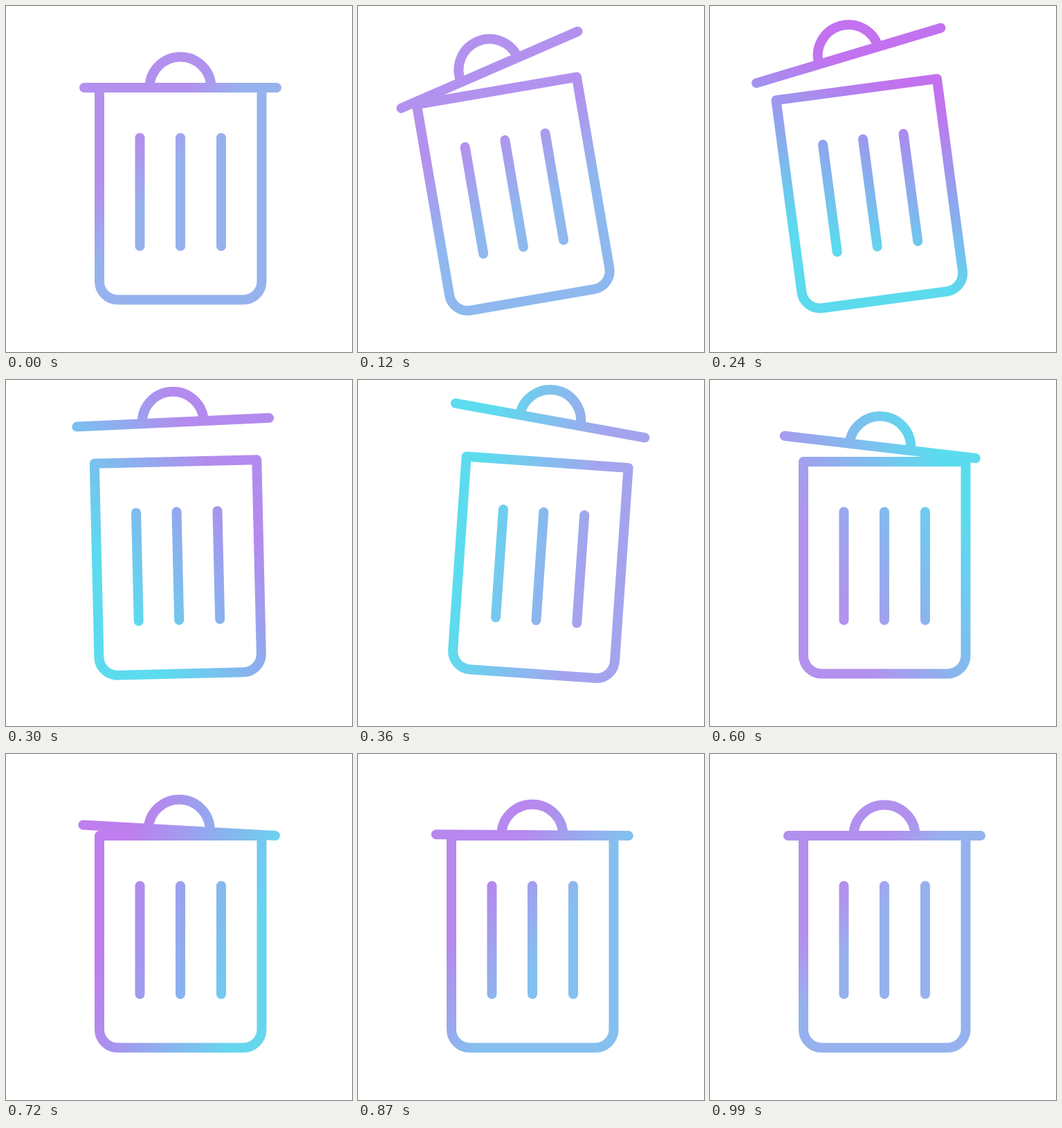
An HTML page that plays this animation: 500 by 500 pixels, repeating every 3020 ms.

```html
<!DOCTYPE html>
<html lang="en">
<head>
<meta charset="utf-8">
<title>Trash can</title>
<style>
  html, body { margin: 0; width: 100%; height: 100%; overflow: hidden; background: #fff; }
  svg { display: block; width: 100%; height: 100%; }
  #can { fill: none; stroke: #fff; stroke-width: 14; stroke-linecap: round; stroke-linejoin: round; }
</style>
</head>
<body>
<svg viewBox="0 0 500 500">
  <defs>
    <linearGradient id="paint" gradientUnits="userSpaceOnUse">
      <stop id="warm" offset="0"/>
      <stop id="cool" offset="1"/>
    </linearGradient>
    <mask id="shape" maskUnits="userSpaceOnUse" x="0" y="0" width="500" height="500">
      <g id="can">
        <path d="M135 118H369.5V398a26.5 26.5 0 0 1-26.5 26.5H161.5a26.5 26.5 0 0 1-26.5-26.5Z"/>
        <path d="M193.5 190.5V347M252 190.5V347M311 190.5V347"/>
        <path id="lid" d="M-139 0H139M-44.5 0a44.5 44.5 0 0 1 89 0"/>
      </g>
    </mask>
  </defs>
  <rect width="500" height="500" fill="url(#paint)" mask="url(#shape)"/>
</svg>
<script>
const LOOP = 3020, STEP = 30, END = 990;
const $ = id => document.getElementById(id);

// Monotone cubic curve through (times[i], values[i]), at rest at both ends.
function track(times, values) {
  const n = times.length;
  const rate = i => (values[i + 1] - values[i]) / (times[i + 1] - times[i]);
  const slope = values.map((_, i) => {
    if (i === 0) return rate(0);
    if (i === n - 1) return 0;
    const a = rate(i - 1), b = rate(i);
    return a * b > 0 ? 2 * a * b / (a + b) : 0;
  });
  return t => {
    if (t >= times[n - 1]) return values[n - 1];
    let i = 0;
    while (t >= times[i + 1]) i++;
    const h = times[i + 1] - times[i], u = (t - times[i]) / h, v = 1 - u;
    return values[i] * (1 + 2 * u) * v * v + slope[i] * h * u * v * v
      + values[i + 1] * u * u * (3 - 2 * u) - slope[i + 1] * h * u * u * v;
  };
}

const poseTimes = [0, 120, 240, 360, 480, 540, 720, 930];
const pose = (...values) => track(poseTimes, values);
const tilt = pose(0, -9.75, -7.6, 4, 1.3, 0, 0, 0);
const lidTurn = pose(0, -13.75, -9.05, 6.3, 10.4, 8.6, 3.2, 0);
const lidX = pose(252, 247.2, 247.4, 252.1, 242.3, 243.5, 250.2, 252);
const lidY = pose(118, 86.5, 67.8, 57.6, 74.8, 87.5, 110.2, 118);

const paintTimes = [0, 120, 240, 360, 480, 720, 990];
const tone = (...values) => track(paintTimes, values);
const heading = tone(40, 65, 113, 190, 270, 375, 400);
const from = tone(-90, -98, -148, -72, -56, -110, -90);
const to = tone(-28, 17, 95, 100, 154, 110, -28);
const warm = [
  tone(178, 178, 194, 164, 165, 190, 178),
  tone(144, 146, 114, 164, 165, 126, 144)
];
const cool = [
  tone(150, 142, 92, 92, 86, 102, 150),
  tone(178, 184, 218, 220, 222, 214, 178)
];
const color = (channels, t) => `rgb(${channels.map(c => Math.round(c(t)))},238)`;

function draw(t) {
  $('can').setAttribute('transform', `rotate(${tilt(t)} 252 424.5)`);
  $('lid').setAttribute('transform', `translate(${lidX(t)} ${lidY(t)}) rotate(${lidTurn(t)})`);

  const a = heading(t) * Math.PI / 180;
  [from(t), to(t)].forEach((s, i) => {
    $('paint').setAttribute('x' + (i + 1), 252 + s * Math.cos(a));
    $('paint').setAttribute('y' + (i + 1), 269 + s * Math.sin(a));
  });
  $('warm').setAttribute('stop-color', color(warm, t));
  $('cool').setAttribute('stop-color', color(cool, t));
}

const start = performance.now();
function tick() {
  const t = (performance.now() - start) % LOOP;
  draw(Math.min(END, Math.floor(t / STEP) * STEP));
  requestAnimationFrame(tick);
}
tick();
</script>
</body>
</html>
```
